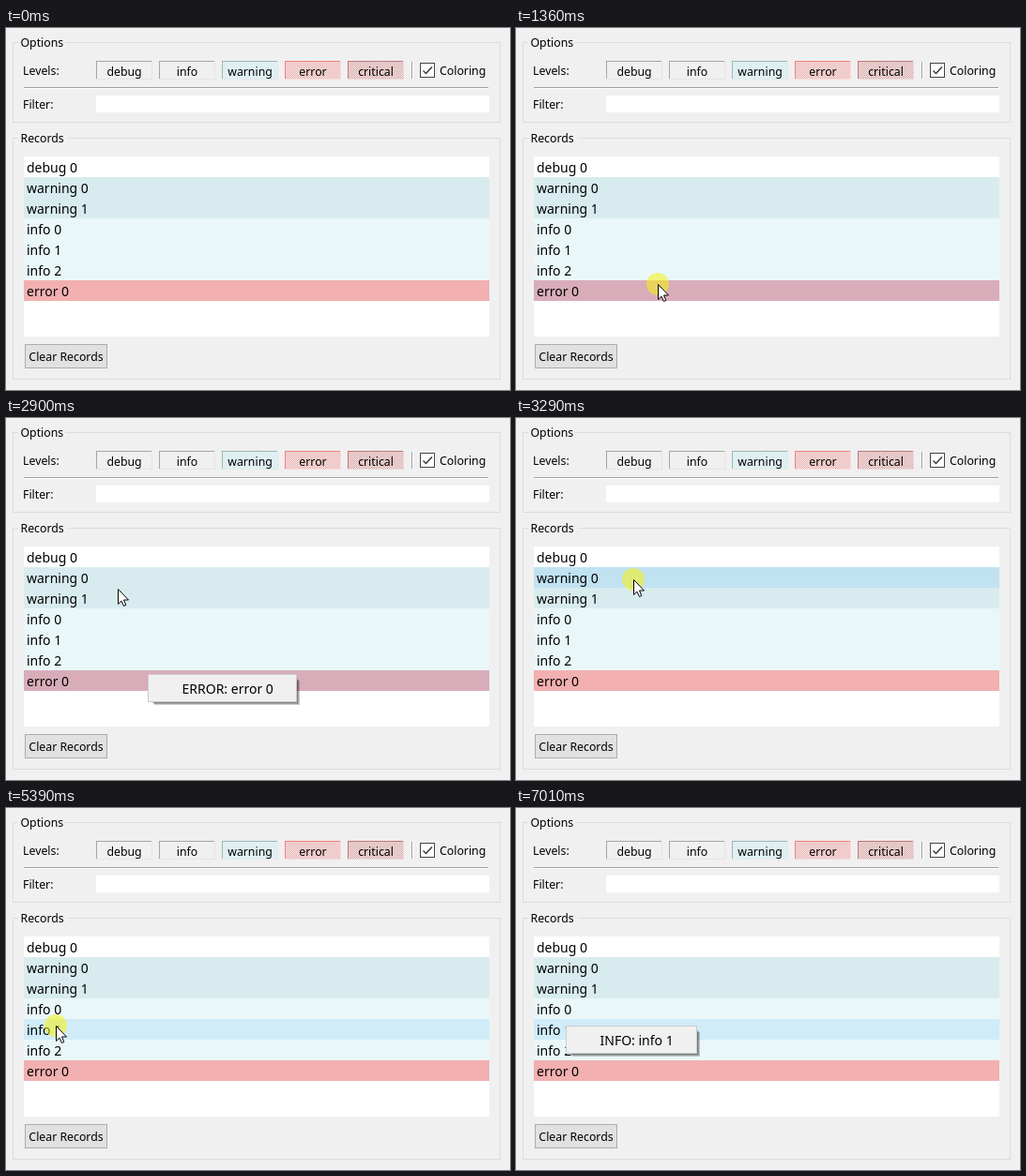
These frames come from a looping animation (537x386 px, 7180 ms). An HTML page with a canvas:

```html
<!DOCTYPE html>
<html lang="en">
<head>
<meta charset="utf-8">
<title>Log records</title>
<style>
  html, body { margin: 0; width: 100%; height: 100%; overflow: hidden; background: #f0f0f0; }
  canvas { display: block; }
</style>
</head>
<body>
<canvas id="stage" width="537" height="386"></canvas>
<script>
const ctx = document.getElementById('stage').getContext('2d');
const LOOP = 7180, ENTER = 660, EXIT = 7010;
const TICK = 77;   // time between pointer steps
const FLASH = 80;  // length of a click mark and of the menu fade
const ROW = 22;
const FACE = '#f0f0f0';
const SMALL = '12.3px "Noto Sans", "Open Sans", sans-serif';
const LARGE = '14px "Noto Sans", "Open Sans", sans-serif';

const LEVELS = {
  debug: { tint: FACE, edge: '#a0a6a6', row: '#fff' },
  info: { tint: FACE, edge: '#a0a6a6', row: '#e9f7f8' },
  warning: { tint: '#cfeff5', edge: '#a0b6b6', row: '#d8ecef' },
  error: { tint: '#f0a8a8', edge: '#f08080', row: '#f2b0b0' },
  critical: { tint: '#dca0a0', edge: '#c07878', row: '#f2b0b0' }
};
const RECORDS = ['debug 0', 'warning 0', 'warning 1', 'info 0', 'info 1', 'info 2', 'error 0'];

// Each visit lights a record, presses it and opens a menu that stays until the next visit.
const VISITS = [
  { row: 6, hover: 964, press: 1360, open: 1500, x: 151, y: 273, w: 159 },
  { row: 1, hover: 3290, press: 3920, open: 3990, x: 125, y: 172, w: 202 },
  { row: 4, hover: 5390, press: 5940, open: 6010, x: 53, y: 232, w: 140 }
];

// Pointer way-points: departure, travel time, destination.
const STOPS = [
  { at: 0, time: 0, x: 185, y: 386 },
  { at: ENTER, time: 380, x: 151, y: 271 },
  { at: 1210, time: 0, x: 151, y: 273 },
  { at: 2280, time: 80, x: 85, y: 273 },
  { at: 2590, time: 310, x: 119, y: 182 },
  { at: 2970, time: 240, x: 125, y: 172 },
  { at: 4750, time: 240, x: 35, y: 240 },
  { at: 5160, time: 70, x: 53, y: 232 },
  { at: 6950, time: 0, x: 54, y: 263 }
];

const checker = (() => {
  const tile = document.createElement('canvas');
  tile.width = tile.height = 2;
  const c = tile.getContext('2d');
  c.fillStyle = FACE;
  c.fillRect(0, 0, 1, 1);
  c.fillRect(1, 1, 1, 1);
  return ctx.createPattern(tile, 'repeat');
})();

const ease = p => p < .5 ? 4 * p ** 3 : 1 - 4 * (1 - p) ** 3;

function box(x, y, w, h, fill) {
  ctx.fillStyle = fill;
  ctx.fillRect(x, y, w, h);
}

function frame(x, y, w, h, color) {
  ctx.strokeStyle = color;
  ctx.lineWidth = 1;
  ctx.strokeRect(x + .5, y + .5, w - 1, h - 1);
}

function label(text, x, y, font = SMALL, align = 'left') {
  ctx.font = font;
  ctx.textAlign = align;
  ctx.fillStyle = '#000';
  ctx.fillText(text, x, y);
}

function path(points) {
  ctx.beginPath();
  points.forEach(([x, y]) => ctx.lineTo(x, y));
}

function group(title, y, h, gap) {
  frame(7, y, 520, h, '#dcdcdc');
  box(13, y, gap, 1, FACE);
  label(title, 15.5, y + 5);
}

function drawLevel(name, x, { tint, edge }) {
  box(x, 35, 60, 20, tint);
  box(x, 35, 60, 20, checker);
  frame(x, 35, 60, 20, edge);
  box(x, 54, 60, 1, 'rgba(255,255,255,.7)');
  box(x + 59, 35, 1, 19, 'rgba(255,255,255,.7)');
  label(name, x + 30, 51, SMALL, 'center');
}

function drawOptions() {
  group('Options', 15, 86, 50);
  label('Levels:', 18, 50);
  Object.keys(LEVELS).forEach((name, i) => drawLevel(name, 96 + i * 67, LEVELS[name]));
  box(432, 36, 1, 18, '#a0a0a0');
  box(433, 36, 1, 18, '#fff');
  box(441, 37, 16, 16, '#fff');
  frame(441, 37, 16, 16, '#444');
  path([[444.5, 45.5], [447.5, 48.5], [454, 41.5]]);
  ctx.strokeStyle = '#333';
  ctx.lineWidth = 1.4;
  ctx.stroke();
  label('Coloring', 462, 50);
  box(19, 63, 495, 1, '#a0a0a0');
  box(19, 64, 495, 1, '#fff');
  label('Filter:', 18, 86);
  box(96, 72, 419, 18, '#fff');
}

function drawRecords(lit) {
  group('Records', 117, 258, 53);
  box(19, 137, 496, 192, '#fff');
  RECORDS.forEach((text, i) => {
    const y = 137 + i * ROW;
    box(19, y, 496, ROW, LEVELS[text.split(' ')[0]].row);
    if (i === lit) box(19, y, 496, ROW, 'rgba(0,144,255,.11)');
    label(text, 22, y + 17, LARGE);
  });
  box(20, 337, 88, 26, '#e1e1e1');
  frame(20, 337, 88, 26, '#adadad');
  label('Clear Records', 64, 355, SMALL, 'center');
}

function drawMenu({ x, y, w, row, open }, t) {
  const text = RECORDS[row];
  ctx.globalAlpha = t < open + FLASH ? .5 : 1;
  for (let i = 1; i <= 3; i++) box(x + 4 + i, y + 4 + i, w - 4, 26, 'rgba(0,0,0,.2)');
  box(x, y, w, 30, FACE);
  frame(x, y, w, 30, '#ccc');
  label(text.split(' ')[0].toUpperCase() + ': ' + text, x + 36.5, y + 21, LARGE);
  ctx.globalAlpha = 1;
}

function pointerAt(t) {
  const i = STOPS.findLastIndex(s => t >= s.at);
  const from = STOPS[i - 1], to = STOPS[i];
  const steps = Math.round(to.time / TICK) + 1;
  const done = Math.floor((t - to.at) / TICK + .1) + 1;
  const k = ease(Math.min(1, done / steps));
  return [from.x + (to.x - from.x) * k, from.y + (to.y - from.y) * k].map(Math.round);
}

function isClicking(t) {
  return VISITS.some(({ hover, press, open }, i) =>
    t >= press && t < open || i > 0 && t >= hover && t < hover + FLASH);
}

function drawPointer(t) {
  const [x, y] = pointerAt(t);
  if (isClicking(t)) {
    ctx.fillStyle = 'rgba(245,243,15,.55)';
    ctx.beginPath();
    ctx.arc(x, y, 12, 0, Math.PI * 2);
    ctx.fill();
  }
  ctx.save();
  ctx.translate(x + .5, y + .5);
  path([[0, 0], [0, 16], [3.5, 12.7], [6, 18], [8.3, 17], [6, 11.5], [11, 11.5]]);
  ctx.closePath();
  ctx.fillStyle = '#fff';
  ctx.fill();
  ctx.strokeStyle = '#000';
  ctx.lineWidth = 1;
  ctx.stroke();
  ctx.restore();
}

function draw() {
  const t = performance.now() % LOOP;
  const visit = VISITS.findLast(v => t >= v.hover);
  box(0, 0, 537, 386, FACE);
  drawOptions();
  drawRecords(visit?.row);
  if (visit && t >= visit.open) drawMenu(visit, t);
  if (t >= ENTER && t < EXIT) drawPointer(t);
  requestAnimationFrame(draw);
}

draw();
</script>
</body>
</html>
```
